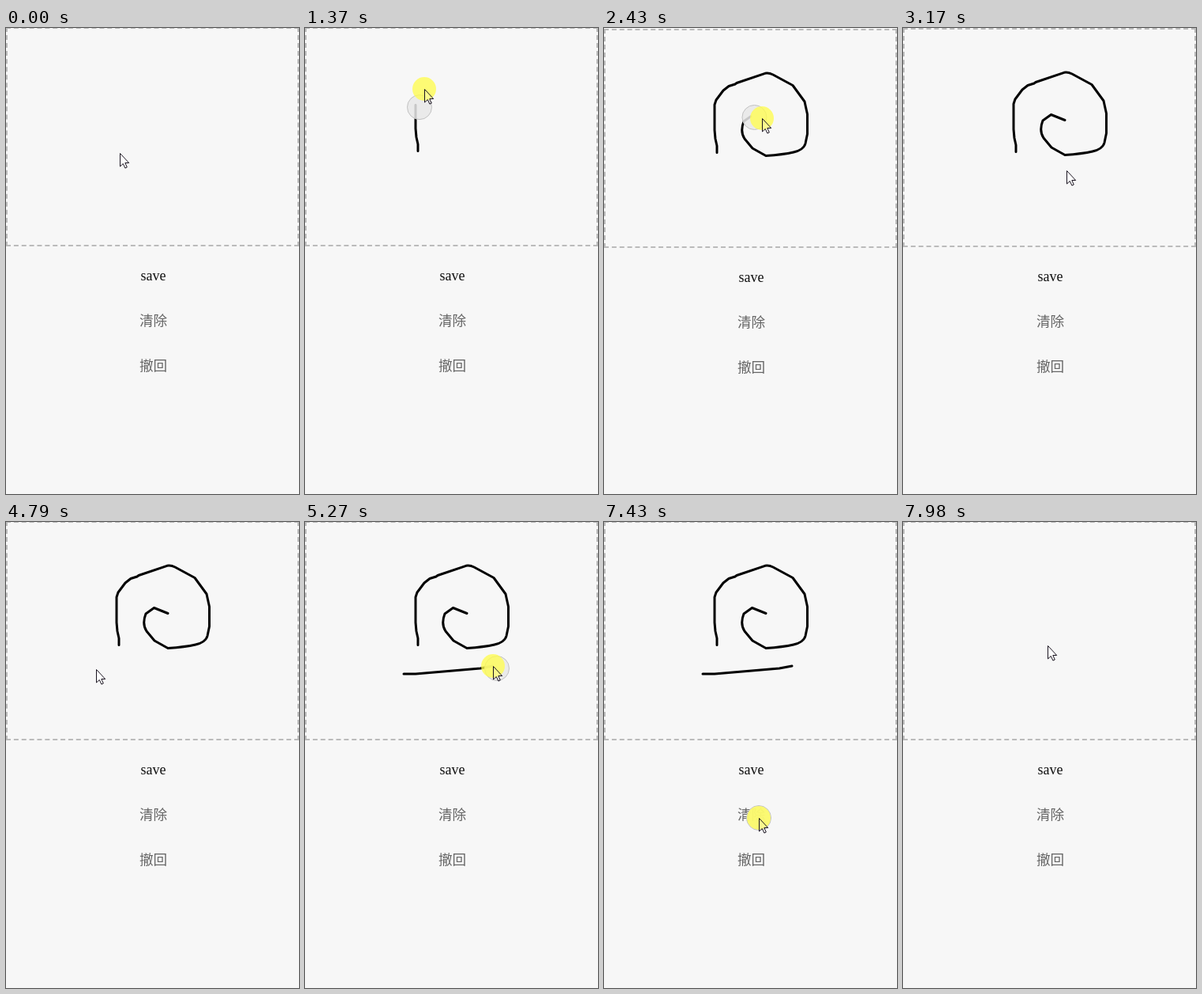
These frames come from a looping animation (371 px wide and 589 px high, 8 s). An HTML page:

```html
<!DOCTYPE html>
<html lang="zh">
<head>
<meta charset="utf-8">
<title>Sketch pad</title>
<style>
  html, body { margin: 0; width: 371px; height: 589px; overflow: hidden; background: #f7f7f7; }
  body { position: relative; }
  #page, svg { position: absolute; left: 0; top: 0; width: 371px; height: 589px; }
  #pad {
    position: absolute; left: 0; top: -1px; width: 371px; height: 277px;
    box-sizing: border-box; border: 2px dashed #bbb;
  }
  text { font: 18px "Liberation Serif", serif; text-anchor: middle; fill: #111; }
  .zh { font: 300 17.6px "Noto Sans CJK SC", "Noto Sans CJK", sans-serif; fill: #666; }
  path { fill: none; }
  .ink { stroke: #000; stroke-width: 3; stroke-linecap: round; stroke-linejoin: round; }
  #touch { fill: rgba(232, 232, 232, .86); stroke: #c2c2c2; }
  #halo { fill: rgba(255, 252, 80, .78); }
  #arrow { fill: #fff; stroke: #1a1420; }
</style>
</head>
<body>
<div id="page">
  <div id="pad"></div>
  <svg viewBox="0 0 371 589">
    <text x="186.5" y="319">save</text>
    <text class="zh" x="186.5" y="376">清除</text>
    <text class="zh" x="186.5" y="433">撤回</text>
    <g id="paths"></g>
  </svg>
</div>
<svg viewBox="0 0 371 589">
  <circle id="touch" r="15.5"/>
  <circle id="halo" r="15"/>
  <path id="arrow" d="M.5 .5V17l3.8-3.5 2.6 5.6 2.4-1.1-2.5-5.5h4.9z"/>
</svg>
<script>
const LOOP = 8000, START = 1200, TICK = 78.1;
const TAP = 80;

const SPIRAL = 'M143 155.5V147L141 138 140 127V95L142 89 151 77 158 71.5 166 69 168 67.5 204 55.3' +
  'Q209 54.5 214 57L239 70.5 254 91 257.5 107V132L255 144Q253 152 240 155' +
  'T205 159.5L188 150 178 138Q172 129 177 116L187.5 108.5 205 115.5';

// Pointer moves in ticks; one with a release time draws ink.
const moves = [
  { from: 0, to: 17, up: 19, d: SPIRAL },
  { from: 19, to: 25, d: 'M206 117L207 180' },
  { from: 25, to: 31, d: 'M207 180Q275 270 189 355' },
  { from: 35, to: 37, d: 'M189 355L195 369' },
  { from: 41, to: 46, d: 'M195 369L114 186' },
  { from: 47, to: 52, up: 54, d: 'M125 192H140L222 185 238 182' },
  { from: 54, to: 59, d: 'M241 178Q250 290 196 396' },
  { from: 61, to: 63, d: 'M196 396V374' },
  { from: 83, to: 87, d: 'M196 374Q228 290 183 156' }
];

const $ = id => document.getElementById(id);
const clamp = v => Math.min(1, Math.max(0, v));
const smooth = u => u * u * (3 - 2 * u);
const pace = u => u ** .9;                  // ink along a stroke
const lead = u => pace(1 - (1 - u) ** 1.5); // pointer running ahead of the ink

for (const m of moves) {
  m.el = document.createElementNS('http://www.w3.org/2000/svg', 'path');
  m.el.setAttribute('d', m.d);
  if (m.up) m.el.setAttribute('class', 'ink');
  $('paths').append(m.el);
  m.len = m.el.getTotalLength();
}

const along = (m, f) => m.el.getPointAtLength(m.len * f);
const show = (el, on) => el.style.visibility = on ? 'visible' : 'hidden';
const place = (el, p) => el.setAttribute('transform', `translate(${p.x} ${p.y})`);

function draw(ms) {
  const n = ms < START ? -1 : Math.floor((ms - START + 20) / TICK);
  const move = moves.filter(m => n >= m.from).pop();
  const tapping = n >= TAP && n < TAP + 2;
  const dragging = Boolean(move && n < move.up);

  let pos = { x: 144, y: 158 };
  if (move) {
    const u = clamp((n - move.from) / (move.to - move.from));
    const p = along(move, move.up ? lead(u) : smooth(u));
    pos = { x: Math.round(p.x), y: Math.round(p.y) };
  }

  let finger = pos;
  for (const m of moves.filter(m => m.up)) {
    const f = pace(clamp((n - m.from) / (m.to - m.from)));
    m.el.style.strokeDasharray = `${m.len * f} 999`;
    show(m.el, n >= m.from && n <= TAP);
    if (dragging && m === move) {
      const tip = along(m, f);
      finger = { x: tip.x + 5, y: tip.y + 3 };
    }
  }

  // The page is pulled down a little by the first drag, then springs back.
  const pull = n < 10 || n >= 28 ? 0 : n < 21 ? 2 : 1;
  $('page').style.transform = `translateY(${pull}px)`;

  const pressed = dragging || tapping;
  place($('touch'), finger);
  place($('halo'), pos);
  place($('arrow'), pos);
  show($('touch'), pressed);
  show($('halo'), pressed);
  $('arrow').style.fillOpacity = pressed ? .2 : 1;
}

const begin = performance.now();
function frame() {
  draw((performance.now() - begin) % LOOP);
  requestAnimationFrame(frame);
}
frame();
</script>
</body>
</html>
```
